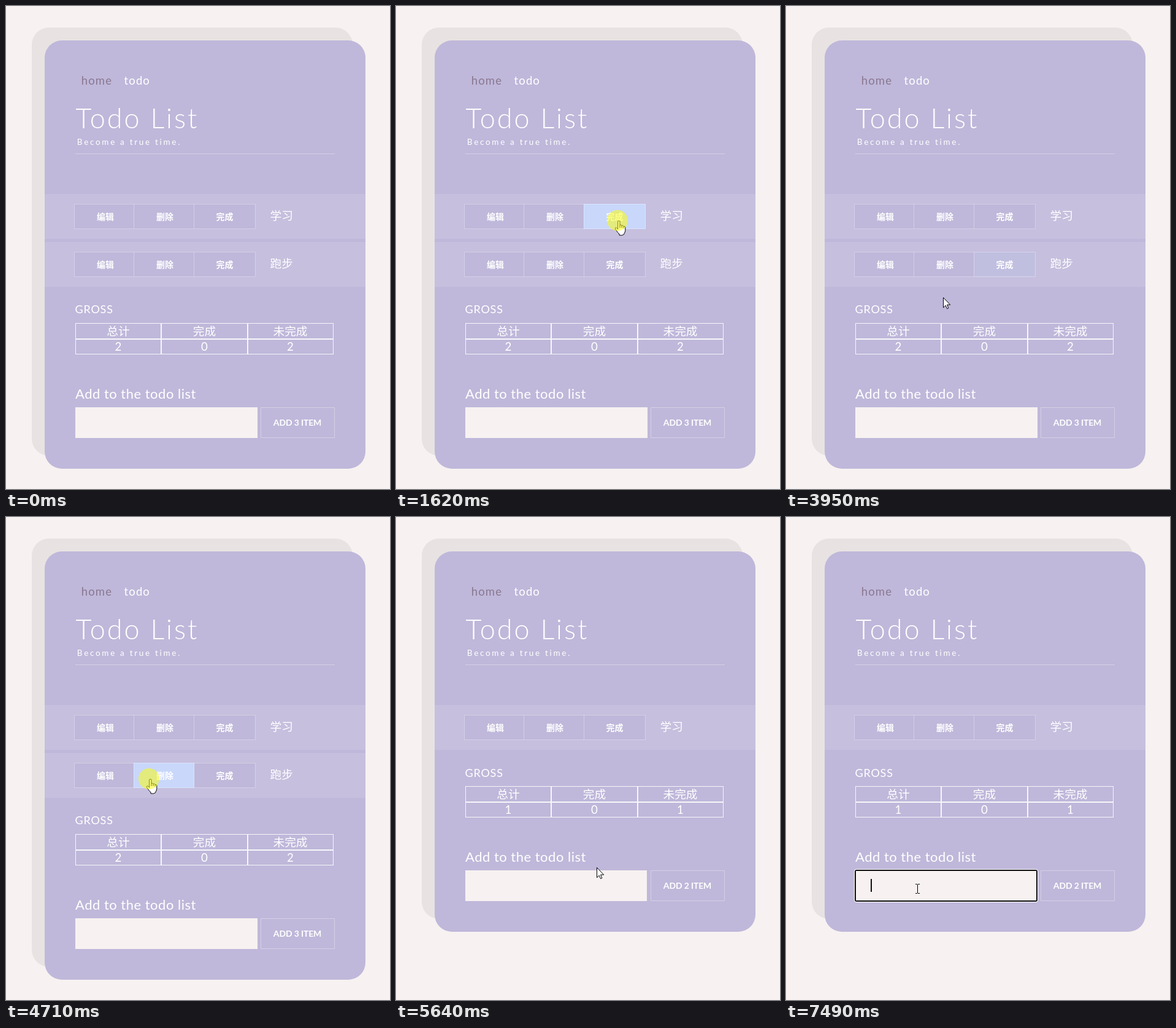
These frames come from a looping animation (626x786 px, 8000 ms). An HTML page with a canvas:

```html
<!DOCTYPE html>
<html lang="zh-CN">
<head>
<meta charset="utf-8">
<title>Todo List</title>
<style>
html, body { margin: 0; width: 100%; height: 100%; overflow: hidden; background: #f7f1f1; }
canvas { display: block; }
</style>
</head>
<body>
<canvas id="stage" width="626" height="786"></canvas>
<script>
const ctx = document.getElementById('stage').getContext('2d');
const LOOP = 8000;
const PAGE = '#f7f1f1', BACK = '#e8e3e2', CARD = '#bfb8da', STRIP = '#c6bfde', HOVER = '#c8d7fa';
const LINE = 'rgba(255,255,255,.32)', WHITE = '#fff';
const LATIN = 'Lato, "Open Sans", sans-serif';
const HAN = '"Noto Sans CJK SC", "Noto Sans CJK", sans-serif';

// Pointer moves as [time, x, y]; it rests between them.
const MOVES = [
  [[480, 622, 464], [600, 540, 446], [700, 450, 404], [800, 392, 365], [920, 372, 360], [1100, 364, 352], [1280, 361, 349]],
  [[3650, 361, 349], [3740, 352, 392], [3840, 318, 447], [3950, 256, 474], [4080, 217, 467], [4200, 214, 449], [4320, 226, 432], [4430, 233, 426]],
  [[5440, 233, 426], [5540, 282, 498], [5640, 327, 570], [5750, 322, 635], [5860, 288, 673], [5980, 246, 656], [6100, 219, 619], [6220, 211, 602]]
];
const CLICKS = [[1620, 1830], [2820, 3030], [4710, 4920], [6450, 6660]];
const DONE = [2140, 3130], DELETED = 4920, FOCUS = 6450;
const BUTTONS = [[111, 98], [208, 99], [306, 101]];

const during = (t, [a, b]) => t >= a && t < b;
const inBox = (p, x, y, w, h) => p.x >= x && p.x < x + w && p.y >= y && p.y < y + h;

function follow(path, t) {
  const n = path.length - 1;
  t = path[0][0] + Math.floor((t - path[0][0]) / 20) * 20;
  if (t >= path[n][0]) return { x: path[n][1], y: path[n][2] };
  let i = 0;
  while (t >= path[i + 1][0]) i++;
  const a = path[i], b = path[i + 1], span = b[0] - a[0], u = (t - a[0]) / span;
  const slope = (k, c) => k === 0 || k === n ? 0
    : (path[k + 1][c] - path[k - 1][c]) / (path[k + 1][0] - path[k - 1][0]);
  const mix = c => {
    const s = u * u * (3 - 2 * u);
    return a[c] + (b[c] - a[c]) * s
      + span * (slope(i, c) * u * (1 - u) * (1 - u) - slope(i + 1, c) * u * u * (1 - u));
  };
  return { x: mix(1), y: mix(2) };
}

function pointer(t) {
  const move = MOVES.filter(m => t >= m[0][0]).pop();
  return move ? follow(move, t) : null;
}

// Share of the last 160 ms the pointer spent on a button: a linear fade.
function hover(t, x, y, w) {
  let hits = 0;
  for (let k = 0; k < 16; k++) {
    const p = pointer(t - k * 10);
    if (p && inBox(p, x, y, w, 41)) hits++;
  }
  return hits / 16;
}

function rect(color, x, y, w, h) {
  ctx.fillStyle = color;
  ctx.fillRect(x, y, w, h);
}

function round(color, x, y, w, h, r) {
  ctx.fillStyle = color;
  ctx.beginPath();
  ctx.roundRect(x, y, w, h, r);
  ctx.fill();
}

function frame(color, x, y, w, h) {
  ctx.strokeStyle = color;
  ctx.lineWidth = 1;
  ctx.strokeRect(x + .5, y + .5, w - 1, h - 1);
}

function text(str, x, y, font, { align = 'left', space = 0, color = WHITE } = {}) {
  ctx.font = font;
  ctx.textAlign = align;
  ctx.letterSpacing = space + 'px';
  ctx.fillStyle = color;
  ctx.fillText(str, x, y);
}

function header() {
  text('home', 122.8, 128, `18.5px ${LATIN}`, { space: 1.1, color: '#8a7890' });
  text('todo', 192.6, 128, `18.5px ${LATIN}`, { space: 1.1 });
  text('Todo List', 113.5, 199, `300 45px ${LATIN}`, { space: 2.85 });
  text('Become a true time.', 115.8, 226, `13.5px ${LATIN}`, { space: 2.7 });
  rect(LINE, 113, 240, 423, 1);
}

function row(t, y, label, done) {
  rect(STRIP, 63, y, 523, 73);
  const top = y + 16;
  rect(CARD, 111, top, 296, 41);
  const names = ['编辑', '删除', done ? '取消' : '完成'];
  BUTTONS.forEach(([x, w], i) => {
    ctx.globalAlpha = hover(t, x, top, w);
    rect(HOVER, x, top, w, 41);
    ctx.globalAlpha = 1;
    text(names[i], [162, 259, 356.5][i], y + 42, `bold 14px ${HAN}`, { align: 'center' });
  });
  frame(LINE, 111, top, 296, 41);
  rect(LINE, 208, top + 1, 1, 39);
  rect(LINE, 306, top + 1, 1, 39);
  text(label, 430.5, y + 42, `18.72px ${HAN}`);
  if (done) {
    const p = Math.min(1, Math.floor((t - DONE[0]) / 20) / 16);
    rect(WHITE, 418, y + 37, 66 * (1 - (1 - p) ** 2), 2);
  }
}

function summary(dy, counts) {
  text('GROSS', 112.5, 500 + dy + (dy ? 1 : 0), `18px ${LATIN}`, { space: .8 });
  [[113, 140], [253, 141], [394, 140]].forEach(([x, w], i) => {
    const mid = [183, 323.5, 463.5][i];
    frame('rgba(255,255,255,.88)', x, 516 + dy, w, 26);
    frame('rgba(255,255,255,.88)', x, 542 + dy, w, 25);
    text(['总计', '完成', '未完成'][i], mid, 536 + dy, `18.72px ${HAN}`, { align: 'center' });
    text(String(counts[i]), mid, 561 + dy, `18.72px ${LATIN}`, { align: 'center' });
  });
}

function form(t, dy, next) {
  const y = 653 + dy;
  text('Add to the todo list', 113, 639 + dy, `22px ${LATIN}`, { space: .5 });
  if (t >= FOCUS) {
    round(WHITE, 111, y - 2, 300, 54, 4);
    round('#101010', 112, y - 1, 298, 52, 3);
    rect(PAGE, 114, y + 1, 294, 48);
    if (Math.floor((t - FOCUS) / 520) % 2 === 0) rect('#101010', 138, y + 14, 2, 21);
  } else {
    rect(PAGE, 113, y, dy ? 296 : 297, 50);
  }
  frame(LINE, 415, y, 121, 50);
  text(`ADD ${next} ITEM`, 475, 683 + dy, `bold 14px ${LATIN}`, { align: 'center', space: -.15 });
}

function outline(path) {
  ctx.fillStyle = WHITE;
  ctx.strokeStyle = '#000';
  ctx.lineWidth = 1;
  ctx.lineJoin = 'round';
  ctx.fill(path);
  ctx.stroke(path);
}

const ARROW = new Path2D('M.5 .5V16.8L4.2 13.3L6.6 18.6L8.9 17.6L6.6 12.2H11.7Z');
const HAND = new Path2D('M.7 14.3V2Q.7 .5 2.3 .5T4 2V7.6Q5.6 6.4 7 8.3Q9 7.4 10 9.4Q12.7 9 12.8 11.5V16.5Q12.6 19 10.8 21.5V22.5Q8 25 3 24V22Q0 19.5 -2 16L-3.6 13.6Q-3.8 11.2 -1.8 11.7Z');
const KNUCKLES = new Path2D('M4 7.5V12M7 8.5V12M10 9.5V12.5');

function cursor(t, p) {
  const dy = t >= DELETED ? -78 : 0;
  const rows = dy ? [322] : [322, 400];
  ctx.save();
  ctx.translate(Math.round(p.x), Math.round(p.y));
  if (rows.some(y => inBox(p, 111, y, 296, 41))) {
    outline(HAND);
    ctx.stroke(KNUCKLES);
  } else if (inBox(p, 113, 653 + dy, 297, 50)) {
    ctx.translate(3, 3);
    for (const y of [-8, 7]) {
      rect('#000', -3, y, 3, 1);
      rect('#000', 1, y, 3, 1);
    }
    rect('#000', 0, -7, 1, 14);
  } else {
    outline(ARROW);
  }
  ctx.restore();
}

function draw(t) {
  const done = during(t, DONE), deleted = t >= DELETED;
  const dy = deleted ? -78 : 0;
  rect(PAGE, 0, 0, 626, 786);
  round(BACK, 42, 35, 523, 697 + dy, 28);
  round(CARD, 63, 56, 523, 697 + dy, 28);
  header();
  row(t, 306, '学习', done);
  if (!deleted) row(t, 384, '跑步', false);
  summary(dy, deleted ? [1, 0, 1] : done ? [2, 1, 1] : [2, 0, 2]);
  form(t, dy, deleted ? 2 : 3);
  const p = pointer(t);
  if (!p) return;
  cursor(t, p);
  if (CLICKS.some(c => during(t, c))) {
    ctx.fillStyle = 'rgba(255,255,0,.5)';
    ctx.beginPath();
    ctx.arc(p.x, p.y, 17, 0, 7);
    ctx.fill();
  }
}

const start = performance.now();
function tick() {
  draw((performance.now() - start) % LOOP);
  requestAnimationFrame(tick);
}
tick();
</script>
</body>
</html>
```
